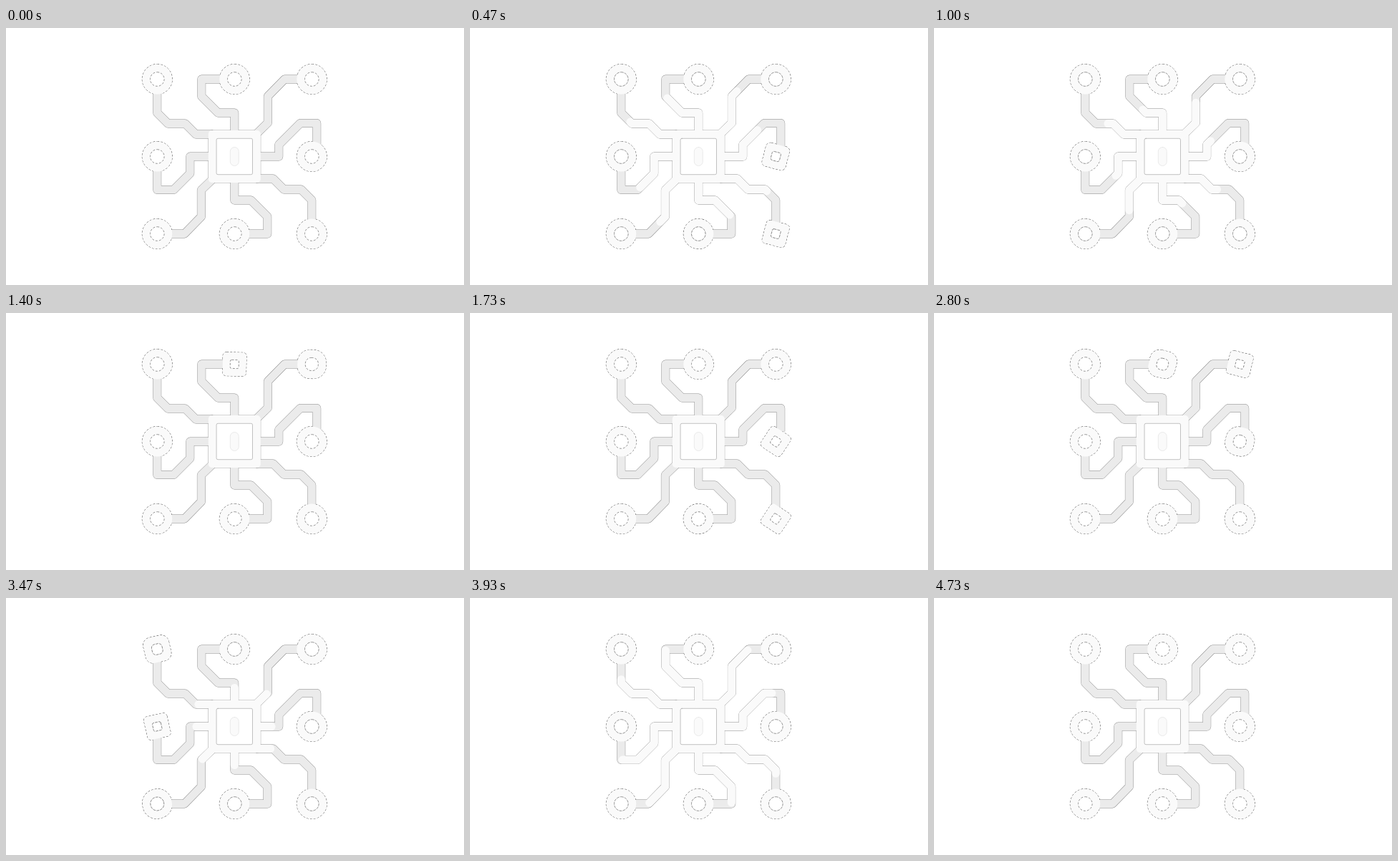
An HTML page with a canvas for the animation above (4.8 s loop, 640 by 359 pixels).

```html
<!DOCTYPE html>
<html lang="en">
<head>
<meta charset="utf-8">
<title>Circuit</title>
<style>
  html, body { margin: 0; width: 100%; height: 100%; overflow: hidden; background: #fff; }
  canvas { display: block; }
</style>
</head>
<body>
<canvas id="stage" width="640" height="359"></canvas>
<script>
const ctx = document.getElementById('stage').getContext('2d');
const LOOP = 4800, TICK = LOOP / 72, BEAT = 1600;
const CX = 319.3, CY = 179.5, PITCH = 108;
const TRACE = '#ebebeb', LIGHT = '#fafafa';
const { PI, sin, cos, abs, min, max, round } = Math;

// Eight nodes on a square grid, clockwise from the top left.
const nodes = Array.from({ length: 8 }, (_, i) => {
  const a = (i - 3) * PI / 4;
  return [round(cos(a)) * PITCH, round(sin(a)) * PITCH];
});

function makeTrace(points, turn = 1) {
  const path = new Path2D();
  let length = 0, last;
  for (const point of points) {
    const [x, y] = point.map(v => v * turn);
    path.lineTo(x, y);
    if (last) length += Math.hypot(x - last[0], y - last[1]);
    last = [x, y];
  }
  return { path, length };
}

// Side trace: out, up, diagonally away, then back down to the node.
const side = (over, end) => [[30, 0], [62, 0], [62, over - 23.5], [85 + over, -46.5],
                             [PITCH + over, -46.5], [PITCH + over, end]];

// Drawn for the upper half, repeated by a half turn below.
const upper = [
  [[-30, -31], [-54, -31], [-69, -46], [-93, -46], [-108, -61], [-108, -108]],
  [[0, -31], [0, -61], [-23, -61], [-46, -84], [-46, -108], [0, -108]],
  [[31, -32], [46.5, -47], [46.5, -84], [70, -108], [108, -108]]
];
const traces = [
  ...upper.flatMap(p => [makeTrace(p), makeTrace(p, -1)]),
  makeTrace(side(7, -14)),
  makeTrace(side(0, 0), -1)
];

// Four clockwise laps; the middle two run slower.
function nodeState(index, t) {
  let square = 0, angle = 0;
  for (let lap = 0; lap < 4; lap++) {
    const start = 217 + 972 * lap + 100 * lap * lap;
    const step = 70 + 64 * sin(PI * lap / 3);
    const d = abs(t - start - step * (index || 8)) / (step * 1.5);
    if (d >= 1) continue;
    square = max(square, min(1, 1.35 * cos(d * PI / 2) ** 2));
    angle = (0.095 * (t - start) - 9) * PI / 180;
  }
  return { square, angle };
}

function reach(t) {
  const p = (t % BEAT - 200) / 980;
  return p > 0 && p < 1 ? 0.7 * sin(PI * p) : 0;
}

const mix = (a, b, k) => a + (b - a) * k;

function box(half, radius, fill, edge, width = 0.7) {
  ctx.beginPath();
  ctx.roundRect(-half, -half, half * 2, half * 2, radius);
  if (fill) { ctx.fillStyle = fill; ctx.fill(); }
  if (edge) { ctx.lineWidth = width; ctx.strokeStyle = edge; ctx.stroke(); }
}

function line(path, color, width) {
  ctx.strokeStyle = color;
  ctx.lineWidth = width;
  ctx.stroke(path);
}

function eachNode(states, draw) {
  nodes.forEach(([x, y], i) => {
    ctx.save();
    ctx.translate(x, y);
    ctx.rotate(states[i].angle);
    draw(states[i].square);
    ctx.restore();
  });
}

function render(t) {
  const states = nodes.map((_, i) => nodeState(i, t));
  const out = reach(t);
  const ring = (k, fill, edge) => box(mix(21, 16.5, k), mix(21, 5, k), fill, edge, 0.9);

  ctx.setTransform(1, 0, 0, 1, 0, 0);
  ctx.fillStyle = '#fff';
  ctx.fillRect(0, 0, 640, 359);
  ctx.translate(CX, CY);
  ctx.lineJoin = 'round';
  ctx.lineCap = 'butt';

  // Fringes first, so the fills join without inner edges.
  for (const { path } of traces) line(path, '#888', 11.8);
  box(36.5, 5, null, '#888');
  ctx.setLineDash([3, 2]);
  eachNode(states, k => ring(k, null, '#444'));
  ctx.setLineDash([]);

  for (const { path } of traces) line(path, TRACE, 11);
  box(36.5, 5, LIGHT);

  if (out) {
    ctx.lineCap = 'round';
    for (const { path, length } of traces) {
      ctx.setLineDash([length * out, length * 2]);
      line(path, LIGHT, 11);
    }
    ctx.setLineDash([]);
  }

  box(25.2, 2, '#fff', '#999', 0.6);
  ctx.beginPath();
  ctx.roundRect(-6, -13, 12, 26, 6);
  ctx.fillStyle = LIGHT;
  ctx.fill();
  line(undefined || new Path2D(), '#ddd', 0.6);
  ctx.stroke();

  eachNode(states, k => {
    ring(k, LIGHT);
    ctx.setLineDash([3, 2]);
    box(mix(9.8, 6, k), mix(9.8, 2, k), '#fff', '#666');
    ctx.setLineDash([]);
  });
}

function frame() {
  const t = performance.now() % LOOP;
  render(Math.floor((t + 5) / TICK) * TICK % LOOP);
  requestAnimationFrame(frame);
}
frame();
</script>
</body>
</html>
```
